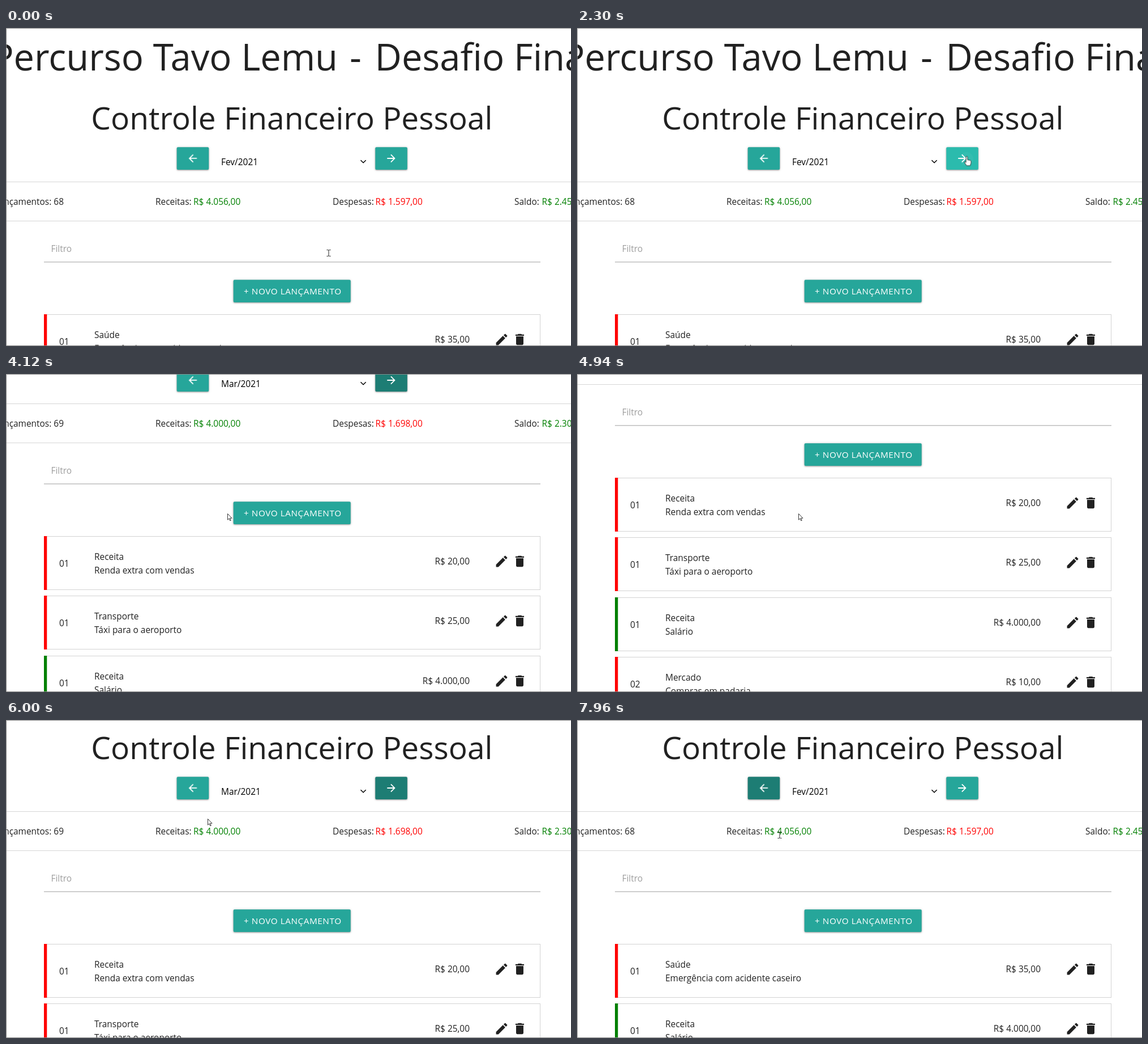
An HTML page that plays this animation: 998 by 561 pixels, repeating every 8 s.

```html
<!DOCTYPE html>
<html lang="pt-BR">
<head>
<meta charset="utf-8">
<title>Controle Financeiro Pessoal</title>
<style>
html, body { margin: 0; width: 100%; height: 100%; overflow: hidden; background: #fff; }
svg { display: block; width: 998px; height: 561px; }
text { font: 15.45px "Open Sans", "Noto Sans", sans-serif; fill: #212121; white-space: pre; }
.h1 { font-size: 65px; }
.h2 { font-size: 55px; }
.end { text-anchor: end; }
.green { fill: #008000; }
.red { fill: #f00; }
.black { fill: #000; }
.hint { fill: #9e9e9e; }
.label { font-size: 15.3px; letter-spacing: .55px; fill: #fff; }
.btn { fill: #26a69a; filter: drop-shadow(0 1.5px 1.2px rgba(0,0,0,.34)) drop-shadow(0 .5px 2px rgba(0,0,0,.14)); }
.ink { fill: #212121; }
.white { fill: #fff; }
.card { fill: none; stroke: #d3d3d3; }
.pointer { fill: #fff; stroke: #222; stroke-width: .9; stroke-linejoin: round; }
.beam { fill: none; stroke: #222; }
</style>
</head>
<body>
<svg id="stage" viewBox="0 0 998 561"></svg>
<script>
const LOOP = 8000;
const NS = 'http://www.w3.org/2000/svg';

const ICONS = {
  back: 'M20 11H7.83l5.59-5.59L12 4l-8 8 8 8 1.41-1.41L7.83 13H20v-2z',
  next: 'M12 4l-1.41 1.41L16.17 11H4v2h12.17l-5.58 5.59L12 20l8-8z',
  edit: 'M3 17.25V21h3.75L17.81 9.94l-3.75-3.75L3 17.25zM20.71 7.04a1 1 0 0 0 0-1.41l-2.34-2.34a1 1 0 0 0-1.41 0l-1.83 1.83 3.75 3.75 1.83-1.83z',
  trash: 'M6 19c0 1.1.9 2 2 2h8c1.1 0 2-.9 2-2V7H6v12zM19 4h-3.5l-1-1h-5l-1 1H5v2h14V4z'
};

const MONTHS = {
  fev: {
    name: 'Fev/2021', count: 68, income: '4.056,00', spent: '1.597,00', balance: '2.459,00',
    rows: [
      ['01', 'Saúde', 'Emergência com acidente caseiro', '35,00', 'red'],
      ['01', 'Receita', 'Salário', '4.000,00', 'green']
    ]
  },
  mar: {
    name: 'Mar/2021', count: 69, income: '4.000,00', spent: '1.698,00', balance: '2.302,00',
    rows: [
      ['01', 'Receita', 'Renda extra com vendas', '20,00', 'red'],
      ['01', 'Transporte', 'Táxi para o aeroporto', '25,00', 'red'],
      ['01', 'Receita', 'Salário', '4.000,00', 'green'],
      ['02', 'Mercado', 'Compras em padaria', '10,00', 'red']
    ]
  }
};

function add(parent, tag, attrs = {}) {
  const el = document.createElementNS(NS, tag);
  for (const k in attrs) el.setAttribute(k, attrs[k]);
  return parent.appendChild(el);
}

function text(parent, x, y, str, cls = '') {
  add(parent, 'text', { x, y, class: cls }).textContent = str;
}

function rect(parent, x, y, width, height, cls, rx = 0) {
  return add(parent, 'rect', { x, y, width, height, rx, class: cls });
}

function line(parent, y, x1, x2, stroke) {
  add(parent, 'path', { d: `M${x1} ${y}H${x2}`, stroke });
}

function icon(parent, name, x, y, scale, cls) {
  add(parent, 'path', {
    d: ICONS[name], class: cls,
    transform: `translate(${x} ${y}) scale(${scale}) translate(-12 -12)`
  });
}

// Each step is [time, value] and holds until the next one.
function play(el, prop, steps) {
  const frames = steps.map(([t, v]) => ({ offset: t / LOOP, [prop]: v, easing: 'steps(1)' }));
  frames.push({ offset: 1, [prop]: steps[steps.length - 1][1] });
  el.animate(frames, { duration: LOOP, iterations: Infinity });
}

const stage = document.getElementById('stage');
rect(stage, 0, 0, 998, 561, 'white');
const page = add(stage, 'g');

// Headings
text(page, 586, 74.6, 'Percurso Tavo Lemu', 'h1 end');
text(page, 607, 74.6, '-', 'h1');
text(page, 651.5, 74.6, 'Desafio Final', 'h1');
text(page, 150.3, 178.6, 'Controle Financeiro Pessoal', 'h2');

// Month buttons with their ripple
function navButton(id, x, name, touch) {
  const box = rect(page, x, 210.3, 56.5, 39.7, 'btn', 2);
  const clip = add(page, 'clipPath', { id });
  rect(clip, x, 210.3, 56.5, 39.7, '', 2);
  const wave = add(add(add(page, 'g', { 'clip-path': `url(#${id})` }), 'g', {
    transform: `translate(${touch})`
  }), 'circle', { r: 1, class: 'white', opacity: 0 });
  icon(page, name, x + 28.2, 230, .9, 'white');
  return { box, wave };
}
const prev = navButton('clipPrev', 301.7, 'back', '332 230');
const next = navButton('clipNext', 652.3, 'next', '688 231');

add(page, 'path', { d: 'M626.5 233.3l4.6 4.4 4.6-4.4', fill: 'none', stroke: '#000', 'stroke-width': 1.5 });
line(page, 271.5, 0, 998, '#d6d6d6');
line(page, 340.5, 0, 998, '#d6d6d6');

text(page, 264, 312, 'Receitas:');
text(page, 577, 312, 'Despesas:');
text(page, 898, 312, 'Saldo:');

text(page, 79.5, 394.5, 'Filtro', 'hint');
line(page, 412.9, 67, 944, '#9e9e9e');

rect(page, 401.7, 444.2, 207, 39.7, 'btn', 2);
text(page, 420, 470.2, '+ NOVO LANÇAMENTO', 'label');

function drawRow(g, [day, kind, note, amount, color], i) {
  const y = 505.5 + Math.round(i * 105.25);
  rect(g, 67.5, y, 876, 94, 'card');
  rect(g, 67, y - .5, 5.3, 95, color);
  text(g, 94, y + 53, day);
  text(g, 156, y + 41, kind);
  text(g, 156, y + 65, note);
  text(g, 819, y + 49, 'R$ ' + amount, 'end');
  icon(g, 'edit', 875.5, y + 44, 1.1, 'ink');
  icon(g, 'trash', 907.5, y + 44, 1.08, 'ink');
}

function drawMonth(m) {
  const g = add(page, 'g');
  text(g, 380, 242, m.name, 'black');
  text(g, 102, 312, 'Lançamentos: ' + m.count, 'end');
  text(g, 331, 312, 'R$ ' + m.income, 'green');
  text(g, 652.5, 312, 'R$ ' + m.spent, 'red');
  text(g, 946.5, 312, 'R$ ' + m.balance, 'green');
  m.rows.forEach((row, i) => drawRow(g, row, i));
  return g;
}
const fev = drawMonth(MONTHS.fev);
const mar = drawMonth(MONTHS.mar);

// Window frame
add(stage, 'path', { d: 'M.5 561V.5H998M0 560.5H998', fill: 'none', stroke: '#858585' });

// Mouse cursor
const cursor = add(stage, 'g');
const shapes = {
  arrow: add(cursor, 'path', {
    class: 'pointer', d: 'M.5.5V11.2l2.5-2.3 1.7 3.9 1.6-.7-1.7-3.8h3.4z'
  }),
  beam: add(cursor, 'path', {
    class: 'beam', d: 'M-3.5-5.5H-1.5Q0-5.5 0-4.5V4.5Q0 5.5-1.5 5.5H-3.5M3.5-5.5H1.5Q0-5.5 0-4.5M3.5 5.5H1.5Q0 5.5 0 4.5'
  }),
  hand: add(cursor, 'path', {
    class: 'pointer',
    d: 'M-1.3 1.3a1.3 1.3 0 0 1 2.6 0V6l5 1.1q1.2.3 1.2 1.6v3l-1.4 4.6H-.4l-3.4-5.2q-.7-1.6.9-1.7L-1.3 10.6z'
  })
};

const TRACK = [
  [0, 570, 397, 'beam'], [150, 571, 394, 'beam'], [280, 580, 381, 'beam'],
  [420, 600, 355, 'arrow'], [550, 625, 326, 'arrow'], [680, 652, 299, 'arrow'],
  [815, 676, 277, 'arrow'], [950, 691, 261, 'arrow'], [1080, 697, 251, 'arrow'],
  [1200, 692, 240, 'hand'], [1350, 690, 231, 'hand'], [1500, 688.5, 226.5, 'hand'],
  [2960, 600, 234, 'arrow'], [3090, 460, 241, 'arrow'], [3230, 391, 243, 'arrow'],
  [3820, 391, 246, 'arrow'], [5720, 377, 216, 'arrow'], [5880, 361, 185, 'arrow'],
  [6000, 356, 174, 'arrow'], [6310, 343, 133, 'hand'], [6430, 332, 114, 'hand'],
  [7960, 358, 203, 'beam']
];
play(cursor, 'transform', TRACK.map(([t, x, y]) => [t, `translate(${x}px, ${y}px)`]));
for (const kind in shapes) {
  play(shapes[kind], 'opacity', TRACK.map(([t, , , k]) => [t, k === kind ? 1 : 0]));
}

const SCROLL = [
  [0, 0], [3970, 118], [4120, 219], [4390, 297], [4540, 328], [4940, 322],
  [5090, 262], [5250, 219], [5400, 172], [5560, 122], [5720, 110]
];
play(page, 'transform', SCROLL.map(([t, y]) => [t, `translate(0px, ${-y}px)`]));

const SWITCH = [2560, 7510];
play(fev, 'opacity', [[0, 1], [SWITCH[0], 0], [SWITCH[1], 1]]);
play(mar, 'opacity', [[0, 0], [SWITCH[0], 1], [SWITCH[1], 0]]);

const IDLE = '#26a69a', HOVER = '#2bbbad', FOCUS = '#1d7d74';
play(next.box, 'fill', [[0, IDLE], [1200, HOVER], [2960, FOCUS], [6850, IDLE]]);
play(prev.box, 'fill', [[0, IDLE], [6310, HOVER], [7960, FOCUS]]);

// Ripple steps: delay after the press, radius, opacity
const RIPPLE = [
  [0, 6, .02], [390, 12, .04], [510, 30, .14], [650, 45, .14], [790, 60, .07], [930, 60, 0]
];
function ripple(el, start) {
  play(el, 'transform', [[0, 'scale(1)'], ...RIPPLE.map(([d, r]) => [start + d, `scale(${r})`])]);
  play(el, 'opacity', [[0, 0], ...RIPPLE.map(([d, , o]) => [start + d, o])]);
}
ripple(next.wave, 1910);
ripple(prev.wave, 6850);
</script>
</body>
</html>
```
